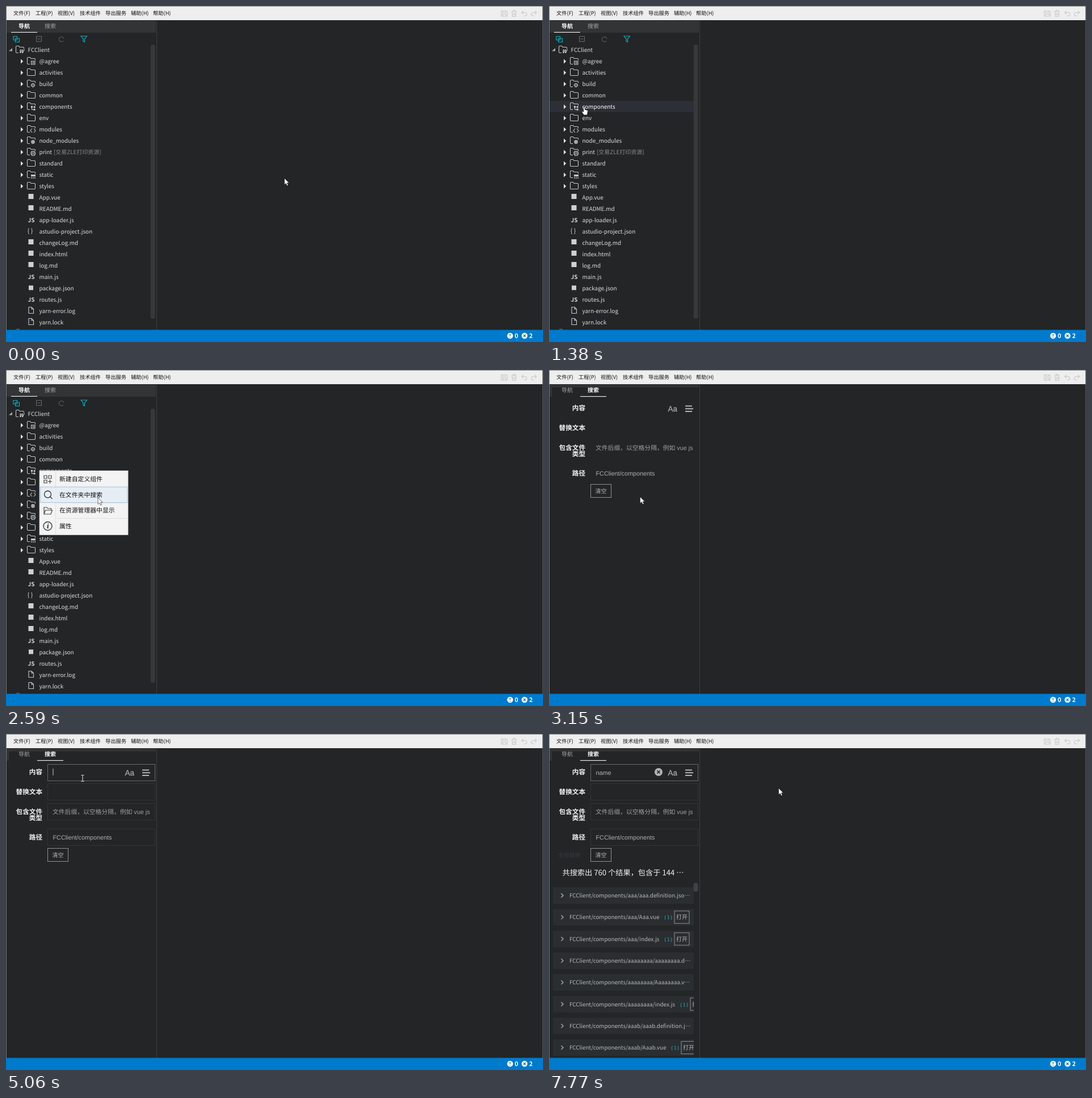
These frames come from a looping animation (946x592 px, 8 s). An HTML page:

```html
<!DOCTYPE html>
<html lang="zh-CN">
<head>
<meta charset="utf-8">
<style>
html, body { margin: 0; width: 100%; height: 100%; overflow: hidden; background: #232527; }
svg { display: block; width: 946px; height: 592px; font-family: "Noto Sans CJK SC", "Noto Sans CJK", sans-serif; }
text { text-rendering: geometricPrecision; }
.line { fill: none; stroke: #c8c8c8; stroke-width: 1.1; }
.input { font-family: "Liberation Sans", "Noto Sans CJK SC", sans-serif; font-size: 10.8px; font-weight: 300; }
.count { font-family: "Noto Sans Mono", monospace; font-size: 9px; }
</style>
</head>
<body>
<svg id="stage" viewBox="0 0 946 592"></svg>
<script>
const BG = '#232527', TEAL = '#13aebc', LOOP = 8000;

const rect = (x, y, w, h, fill, extra = '') =>
  `<rect x="${x}" y="${y}" width="${w}" height="${h}" fill="${fill}" ${extra}/>`;
const text = (x, y, size, fill, str, extra = '') =>
  `<text x="${x}" y="${y}" font-size="${size}" fill="${fill}" ${extra}>${str}</text>`;
const path = (d, stroke = '#c8c8c8', width = 1.1, extra = '') =>
  `<path d="${d}" fill="none" stroke="${stroke}" stroke-width="${width}" ${extra}/>`;
const solid = (d, fill) => `<path d="${d}" fill="${fill}"/>`;
const circle = (x, y, r, fill, extra = '') => `<circle cx="${x}" cy="${y}" r="${r}" fill="${fill}" ${extra}/>`;
const group = (id, body, extra = '') => `<g id="${id}" ${extra}>${body}</g>`;
const at = (x, y, body) => `<g transform="translate(${x} ${y})">${body}</g>`;

// ---- Window frame ----
const menus = [[13, '文件(F)'], [52, '工程(P)'], [91, '视图(V)'], [130, '技术组件'],
  [175, '导出服务'], [220, '辅助(H)'], [259, '帮助(H)']];

const frame = () =>
  rect(0, 0, 946, 25, '#eeeeee') +
  menus.map(([x, label]) => text(x, 16, 9.25, '#111', label)).join('') +
  path('M872.500 8.500h9l1.500 1.500v8h-10.500zM875 8.500v3.500h5v-3.500M875 18v-3.500h6v3.500', '#c9c9c9') +
  path('M890.500 9.500h9M893.500 9v-1.500h3v1.500M891.500 10l.5 8.500h6l.5-8.500M894 12v4.500M896.500 12v4.500', '#c9c9c9') +
  path('M911.500 8.500l-3 3 3 3M909 11.500h5.500q3 0 3 3t-3 3h-2', '#c9c9c9') +
  path('M931.500 8.500l3 3-3 3M934 11.500h-5.500q-3 0-3 3t3 3h2', '#c9c9c9') +
  rect(265, 26, 1, 545, '#3b3d3f') +
  rect(0, 570.6, 946, 21.4, '#007acc') +
  circle(888, 581, 5.2, '#fff') + path('M888 578v3.500M888 583v1.300', '#007acc', 1.4) +
  circle(913.5, 581, 5.2, '#fff') + path('M911.500 579l4 4m0-4l-4 4', '#007acc', 1.3) +
  text(896, 585, 10.8, '#fff', '0', 'font-weight="700"') +
  text(921.5, 585, 10.8, '#fff', '2', 'font-weight="700"') +
  rect(0, 0, 946, 1, '#8a8a8a') + rect(0, 0, 1, 571, '#777') + rect(945, 0, 1, 571, '#555a5e');

// ---- Navigation tree ----
const marks = {
  list: path('M44.500 0h6.500v6h-6.500zM46 2h4M46 4h4'),
  gear: circle(47.5, 2.5, 2.7, 'none', 'class="line"') + circle(47.5, 2.5, 1, '#c8c8c8') +
    path('M47.500-1.500v1.300M47.500 5.200v1.300M43.500 2.500h1.300M50.200 2.500h1.300'),
  parts: rect(44, -1, 3, 3, '#c8c8c8') + rect(48.5, -.5, 3, 3, '#c8c8c8') + rect(48.5, 4, 3, 3, '#c8c8c8') +
    path('M45.500 2v3.500h3'),
  code: path('M46 -1l-3 3.500 3 3.500M49 -1l3 3.500-3 3.500'),
  dot: circle(47.5, 2.5, 3.4, '#a8a8a8'),
  print: path('M45 1v-2h5v2M44 5v-4h7.500v4M45.500 3.500h4.500v3h-4.500z'),
  rows: rect(44, 0, 8, 3, '#c8c8c8') + path('M44 4.500h8M44 6.500h8', '#c8c8c8', 1.2, 'stroke-dasharray="2 1"'),
};
const folder = mark =>
  path('M42 5.500H39Q37.500 5.500 37.500 4V-5Q37.500-6.500 39-6.500H42.500L44-4.500H50Q51.500-4.500 51.500-3V' +
    (mark ? '-1.500' : '4Q51.500 5.500 50 5.500H42')) + (marks[mark] || '');

const plainMark = rect(39.5, -6, 9, 9, '#d0d0d0');
const fileIcons = {
  vue: plainMark, md: plainMark, html: plainMark, pkg: rect(40, -4.5, 8, 8, '#d0d0d0'),
  js: text(38.5, 3.5, 10, '#d8d8d8', 'JS', 'font-weight="700"'),
  json: text(37.8, 2.5, 10.5, '#d8d8d8', '{ }', 'font-weight="500"'),
  file: path('M40-6.500h5l3.500 3.500v7.500h-8.500zM45-6.500v3.500h3.500'),
};
const folders = [['@agree', 'list'], ['activities'], ['build', 'gear'], ['common'], ['components', 'parts'],
  ['env'], ['modules', 'code'], ['node_modules', 'dot'], ['print', 'print'], ['standard'],
  ['static', 'rows'], ['styles']];
const files = [['App.vue', 'vue'], ['README.md', 'md'], ['app-loader.js', 'js'], ['astudio-project.json', 'json'],
  ['changeLog.md', 'md'], ['index.html', 'html'], ['log.md', 'md'], ['main.js', 'js'],
  ['package.json', 'pkg'], ['routes.js', 'js'], ['yarn-error.log', 'file'], ['yarn.lock', 'file']];

const label = name => text(58.5, 4, 9.95, '#dedede', name, 'class="label"');
const treeRow = (body, i) => at(0, 97 + 20 * i, body);

const nav = () =>
  rect(1, 26, 263, 21, '#323436') + rect(9, 45.8, 46, 1.2, '#e8e8e8') +
  text(22, 39, 10, '#fff', '导航', 'font-weight="700"') + text(68, 39, 10, '#a5a5a5', '搜索') +
  path('M13 53.500h6.500v6.500h-6.500zM16.500 57h7v6.500h-7z', TEAL, 1.2) +
  path('M53.500 53.500h9v9h-9zM55.500 58h5', '#6b6d6f', 1) +
  path('M101 61.500a4.300 4.300 0 1 1 1-3.500', '#55585a', 1.2) +
  path('M132 53h10.500l-4 5v5.500l-2.500-1.500v-4z', TEAL, 1.2) +
  rect(254.7, 68, 8, 483, '#36383a', 'rx="4"') +
  solid('M11 74v5.500h-6z', '#a8a8a8') +
  at(-20, 77, folder('none') + text(43, 6, 9, '#ddd', 'W', 'font-weight="700" font-style="italic"')) +
  text(38.5, 81, 9.95, '#dedede', 'FCClient') +
  group('hover', rect(1, 0, 254, 20, '#2c2f35')) +
  folders.map(([name, mark], i) => treeRow(solid('M26-3.500l4.300 4-4.300 4z', '#e0e0e0') + folder(mark) + label(name), i)).join('') +
  text(84, 261, 9.95, '#8a8c8e', '[交易ZLE打印资源]') +
  files.map(([name, icon], i) => treeRow(fileIcons[icon] + label(name), i + 12)).join('') +
  rect(18, 569, 6, 1, '#777');

// ---- Context menu ----
const menuItems = ['新建自定义组件', '在文件夹中搜索', '在资源管理器中显示', '属性'];
const menuY = i => 192 + 27.6 * i;
const contextMenu = () =>
  rect(59, 177.5, 156, 113, '#f3f3f3', 'stroke="#ccc" stroke-width=".8"') + rect(87, 179, 1, 110, '#dedede') +
  [233.5, 261].map(y => rect(90, y, 123, 1, '#e0e0e0')).join('') +
  group('pick', rect(60.5, -13.5, 153.5, 27.5, '#e6edf5', 'stroke="#a9c4dc"')) +
  menuItems.map((item, i) => text(94, menuY(i) + 4, 10.85, '#111', item)).join('') +
  path('M67 186h5v5h-5zM75 186h5v5h-5zM67 194h5v5h-5zM77.500 193v7M74 196.500h7', '#444', 1.2) +
  path('M79.500 219a6 6 0 1 1-12 0a6 6 0 1 1 12 0M78 223.500l3.500 3.500', '#333', 1.3) +
  path('M67 254v-12h5l1.500 2h6v3M67 254l2.500-7h12l-2.500 7z', '#444', 1.2) +
  circle(73.5, 275, 7.5, 'none', 'stroke="#333" stroke-width="1.3"') +
  text(71.8, 279, 11, '#222', 'i', 'font-family="Noto Serif, serif" font-style="italic" font-weight="700"');

// ---- Search panel ----
const labels = [['内容', 71], ['替换文本', 106], ['包含文件', 140.5], ['类型', 152], ['路径', 186]];
const inputTops = [53, 87, 122, 167];
const button = (x, y, w, h, caption) =>
  rect(x + .5, y + .5, w, h, 'none', 'stroke="#8f9193"') +
  text(x + w / 2 + .5, y + h / 2 + 4, 10, '#b5b5b5', caption, 'text-anchor="middle" font-weight="300"');

const search = () =>
  rect(1, 26, 263, 21, '#323436') + rect(5, 30.5, 259, 540, BG) +
  text(22, 39, 10, '#a5a5a5', '导航') + text(68, 39, 10, '#fff', '搜索', 'font-weight="700"') +
  rect(55, 46, 46, 1.2, '#e8e8e8') +
  labels.map(([name, y]) => text(64, y, 11.6, '#f2f2f2', name, 'text-anchor="end" font-weight="700"')).join('') +
  inputTops.map((y, i) => rect(73.5, y + .5, 189, 29, 'none', `id="input${i}"`)).join('') +
  `<g class="input">` +
  text(82.5, 71.5, 10.8, '#b5b5b5', '', 'id="query"') +
  text(82, 140.5, 10.8, '#a0a0a0', '文件后缀，以空格分隔，例如 vue js', 'clip-path="url(#field)"') +
  text(82.5, 186, 10.8, '#b0b0b0', 'FCClient/components') + '</g>' +
  group('caret', rect(0, 61, 1, 12, '#c8c8c8')) +
  group('clear', circle(193, 67, 7, '#b4b4b4') + path('M190.500 64.500l5 5m0-5l-5 5', BG, 1.7)) +
  text(209.5, 73, 13.5, '#a8a8a8', 'Aa', 'font-family="Liberation Sans, sans-serif" stroke="#a8a8a8" stroke-width=".3"') +
  path('M240 63.500h12M240 68.200h14M240 73h12', '#b4b4b4', 1.9) +
  button(73, 201, 36, 23, '清空') +
  group('spinner', path('', TEAL, 2, 'id="arc" stroke-linecap="round"')) +
  group('results', results());

// Each entry: path after the project folder, then the x of its match count if it fits.
const hits = [['aaa/aaa.definition.jso…'], ['aaa/Aaa.vue', 202], ['aaa/index.js', 202], ['aaaaaaaa/aaaaaaaa.d…'],
  ['aaaaaaaa/Aaaaaaaa.v…'], ['aaaaaaaa/index.js', 230], ['aaab/aaab.definition.j…'], ['aaab/Aaab.vue', 214]];
function results() {
  return text(16, 217, 9.9, '#383b3d', '全局替换') +
    text(23.5, 248.5, 13.2, '#f2f2f2', '共搜索出 760 个结果，包含于 144 …', 'font-weight="500"') +
    rect(254.5, 262, 8, 16, '#3f4143', 'rx="4"') +
    '<g clip-path="url(#list)">' + hits.map(([name, x], i) => at(0, 284.5 + 38.3 * i,
      rect(7, -14.5, 248, 29, '#2b2e31') + path('M21.500-3.500l3.500 3.500-3.500 3.500', '#c0c0c0', 1.2) +
      text(36, 3.5, 9.8, '#b8babb', 'FCClient/components/' + name) +
      (x ? text(x, 3.5, 9, '#2aa9b8', '(1)', 'class="count"') + button(x + 18.5, -11.5, 26, 22, '打开') : '')
    )).join('') + '</g>';
}

// ---- Pointers ----
const pointers =
  group('arrow', '<path d="M0 0v11.500l2.700-2.500 1.900 4.200 2-.9-1.900-4h3.700z" fill="#fff" stroke="#111" stroke-width=".6"/>') +
  group('hand', '<path d="M-1.200 0q1.200-1.200 2.400 0v4.500l4.300 1.200q1 .4.900 1.600l-.7 4-.7 2.700h-5.500l-3.500-5q-.4-1.600 1.200-1.500l1.600 1.500z" fill="#fff" stroke="#111" stroke-width=".6"/>') +
  group('beam', path('M-2.500-5.500h1.800l.7.700.7-.7h1.800M0-5v10M-2.500 5.500h1.800l.7-.7.7.7h1.800', '#e8e8e8', 1));

document.getElementById('stage').innerHTML =
  '<defs><clipPath id="field"><rect x="74" y="120" width="180" height="35"/></clipPath>' +
  '<clipPath id="list"><rect x="1" y="260" width="254" height="310"/></clipPath></defs>' +
  rect(0, 0, 946, 592, BG) + group('nav', nav()) + group('menu', contextMenu()) +
  group('search', search()) + frame() + pointers;

// ---- Timeline: [start ms, value...], each value holds until the next ----
const pointerSteps = [
  [0, 'arrow', 490.5, 303.5], [270, 'arrow', 446, 306], [430, 'arrow', 302, 304], [570, 'hand', 215, 269],
  [690, 'hand', 172, 256], [810, 'hand', 153, 249], [960, 'hand', 106.5, 230], [1080, 'hand', 86, 212],
  [1230, 'hand', 68, 205], [1380, 'hand', 62, 178], [1810, 'arrow', 59, 177.5], [1930, 'arrow', 10, 171],
  [2080, 'arrow', 70, 196], [2200, 'arrow', 125, 224], [2320, 'arrow', 160, 250], [2440, 'arrow', 156, 229],
  [2590, 'arrow', 162, 225], [2710, 'arrow', 160.5, 223.5], [3860, 'arrow', 159, 203], [3980, 'beam', 150, 181],
  [4100, 'beam', 142, 140], [4220, 'beam', 136, 104], [4370, 'beam', 130, 94], [4490, 'beam', 126, 91],
  [4610, 'beam', 125, 90], [4910, 'beam', 135, 78], [5180, 'arrow', 282, 84], [5300, 'arrow', 404.5, 95.5]];
const hoverSteps = [[0, -1], [570, 9], [690, 8], [960, 7], [1080, 6], [1230, 5], [1380, 4], [1810, -1]];
const pickSteps = [[0, 0], [2200, 1], [2320, 2], [2440, 1]];
const querySteps = [[0, ''], [6660, 'n'], [6780, 'na'], [6930, 'name']];
const caretSteps = [[0, 0], [5060, 1], [5580, 0], [6130, 1], [7770, 0]];
const inputShown = [4910, 4220, 4100, 3980];
const inputLeft = [Infinity, 4910, 4220, 4100];

const step = (steps, t) => steps.findLast(s => s[0] <= t).slice(1);
const el = Object.fromEntries([...document.querySelectorAll('[id]')].map(e => [e.id, e]));
const show = (id, on) => el[id].style.display = on ? '' : 'none';
const move = (id, x, y) => el[id].setAttribute('transform', `translate(${x} ${y})`);
const rowLabels = [...document.querySelectorAll('.label')];

function draw(t) {
  const searching = t >= 3150;
  show('nav', !searching);
  show('search', searching);
  show('menu', t >= 1810 && !searching);

  const [row] = step(hoverSteps, t);
  show('hover', row >= 0);
  move('hover', 0, 87 + 20 * row);
  rowLabels.forEach((l, i) => l.setAttribute('fill', i === row ? '#fff' : '#dedede'));
  move('pick', 0, menuY(step(pickSteps, t)[0]));

  inputShown.forEach((start, i) => {
    const focused = i === 0 && t >= 5060, hovered = t < inputLeft[i];
    el['input' + i].setAttribute('stroke', t < start ? 'none' : focused ? '#66686a' : hovered ? '#4a4c4e' : '#323436');
  });
  const [query] = step(querySteps, t);
  el.query.textContent = query;
  show('clear', query);
  show('caret', step(caretSteps, t)[0]);
  move('caret', 82.5 + (query ? el.query.getComputedTextLength() : 0), 0);

  show('spinner', t >= 7490 && t < 7770);
  const sweep = t < 7620 ? 1.6 : 4.2;
  el.arc.setAttribute('d', `M134.500 382A16 16 0 ${sweep > Math.PI ? 1 : 0} 1 ` +
    `${134.5 + 16 * Math.sin(sweep)} ${398 - 16 * Math.cos(sweep)}`);
  show('results', t >= 7770);

  const [kind, x, y] = step(pointerSteps, t);
  for (const id of ['arrow', 'hand', 'beam']) show(id, id === kind);
  move(kind, x, y);
}

const begin = performance.now();
function tick() {
  draw((performance.now() - begin) % LOOP);
  requestAnimationFrame(tick);
}
tick();
</script>
</body>
</html>
```
